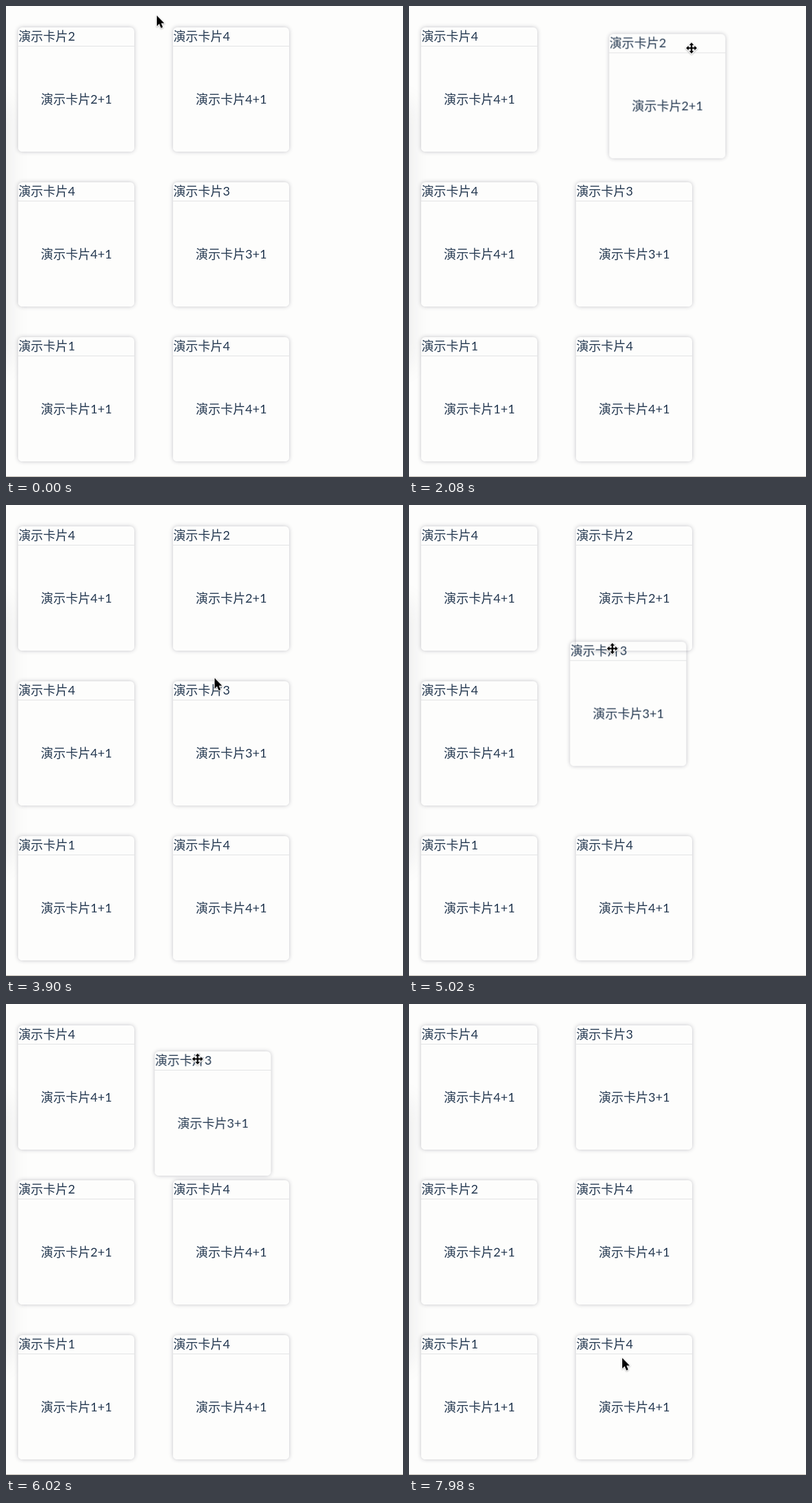
An HTML page that plays this animation: 687x815 px, repeating every 8000 ms.

```html
<!DOCTYPE html>
<html lang="zh">
<head>
<meta charset="utf-8">
<title>演示卡片</title>
<style>
  html, body { margin: 0; width: 100%; height: 100%; overflow: hidden; background: #fdfdfc; }
  #stage {
    position: relative; width: 687px; height: 815px; overflow: hidden;
    font: 21.44px Lato, "Noto Sans CJK SC", "Noto Sans CJK", sans-serif; color: #263a52;
  }
  #edge {
    position: absolute; left: -60px; top: 170px; width: 56px; height: 450px;
    box-shadow: 0 0 44px rgba(30, 30, 50, .13);
  }
  #floor { position: absolute; left: 0; top: 814px; width: 687px; height: 1px; background: #b5afa2; }
  .card {
    position: absolute; left: 21.4px; top: 37px; width: 201px; height: 215px;
    border-radius: 7px; box-shadow: 0 0 7px rgba(40, 40, 60, .28);
    display: flex; flex-direction: column; overflow: hidden; white-space: nowrap;
  }
  .title { height: 31.5px; line-height: 31.5px; border-bottom: 1px solid #dedfe0; }
  .body {
    flex: 1; display: flex; align-items: center; justify-content: center;
    line-height: 30px; background: #fdfdfc;
  }
  #pointer { position: absolute; left: 0; top: 0; width: 1px; height: 1px; overflow: visible; }
  #pointer path { stroke: #fff; stroke-linejoin: round; paint-order: stroke; }
  #pointer g { filter: drop-shadow(0 1px 1px rgba(0, 0, 0, .3)); }
</style>
</head>
<body>
<div id="stage">
  <div id="edge"></div>
  <div id="floor"></div>
  <svg id="pointer">
    <g id="arrow"><path stroke-width="2.4" d="M0 0V18.2L4.2 14.3L7.2 21.4L10.4 20L7.4 13.2H13Z"/></g>
    <g id="move"><path stroke-width="3" d="M0-9.5L4-5H1.3V-1.3H5V-4L9.5 0L5 4V1.3H1.3V5H4L0 9.5L-4 5H-1.3V1.3H-5V4L-9.5 0L-5-4V-1.3H-1.3V-5H-4Z"/></g>
  </svg>
</div>
<script>
const LOOP = 8000, PITCH = 268;
const stage = document.getElementById('stage');
const pointer = document.getElementById('pointer');
const slot = n => [n % 2 * PITCH, Math.floor(n / 2) * PITCH];
const timing = { duration: LOOP, iterations: Infinity };

// Steps are [ms, x, y, easing towards the next step].
function travel(el, steps) {
  const frames = steps.map(([ms, x, y, easing = 'linear']) =>
    ({ offset: ms / LOOP, transform: `translate(${x}px, ${y}px)`, easing }));
  frames.push({ ...frames.at(-1), offset: 1 });
  el.animate(frames, timing);
}

function addCard(number, steps) {
  const card = document.createElement('div');
  card.className = 'card';
  card.innerHTML = `<div class="title">演示卡片${number}</div><div class="body">演示卡片${number}+1</div>`;
  stage.insertBefore(card, pointer);
  travel(card, steps);
}

addCard(1, [[0, ...slot(4)]]);
addCard(4, [[0, ...slot(5)]]);
addCard(4, [[0, ...slot(1)], [1520, ...slot(1), 'ease'], [1820, ...slot(0)]]);
addCard(4, [[0, ...slot(2)], [5600, ...slot(2), 'ease'], [5900, ...slot(3)]]);
addCard(2, [
  [0, ...slot(0)], [850, ...slot(0), 'ease-in'],
  [1420, 155, 21.5], [1520, 155, 21.5], [1900, 290, 14, 'ease-out'],
  [2300, 346, 10, 'ease-in-out'], [2780, 329, 20], [3000, 329, 20, 'ease'],
  [3240, ...slot(1)], [5600, ...slot(1), 'ease'], [5900, ...slot(2)]
]);
addCard(3, [
  [0, ...slot(3)], [4600, ...slot(3), 'ease-in-out'],
  [5580, 241, 88, 'ease-out'], [6500, 234, 23], [6900, 234, 23, 'ease'],
  [7140, ...slot(1)]
]);

travel(pointer, [
  [0, 261, 16.5, 'ease-in-out'], [700, 182, 57], [850, 182, 57, 'ease-in'],
  [1420, 337, 78], [1520, 337, 78], [1900, 461, 74, 'ease-out'],
  [2300, 505, 72, 'ease-in-out'], [2780, 480, 82], [3150, 478, 82, 'ease-in-out'],
  [3850, 361, 299.5], [4000, 361, 299.5, 'ease-out'], [4250, 362, 317],
  [4600, 362, 317, 'ease-in-out'], [5580, 335.5, 136.5, 'ease-out'],
  [6500, 329.5, 74], [7100, 329.5, 74], [7900, 369, 612.5]
]);

// The two pointer shapes alternate at these times, beginning with the arrow.
const switches = [0, 350, 3000, 4050, 6900, 7443, 7491, 7842, 7889, LOOP];
['arrow', 'move'].forEach((id, parity) => {
  const frames = switches.map((ms, i) =>
    ({ offset: ms / LOOP, opacity: +(i % 2 === parity), easing: 'step-end' }));
  document.getElementById(id).animate(frames, timing);
});
</script>
</body>
</html>
```
